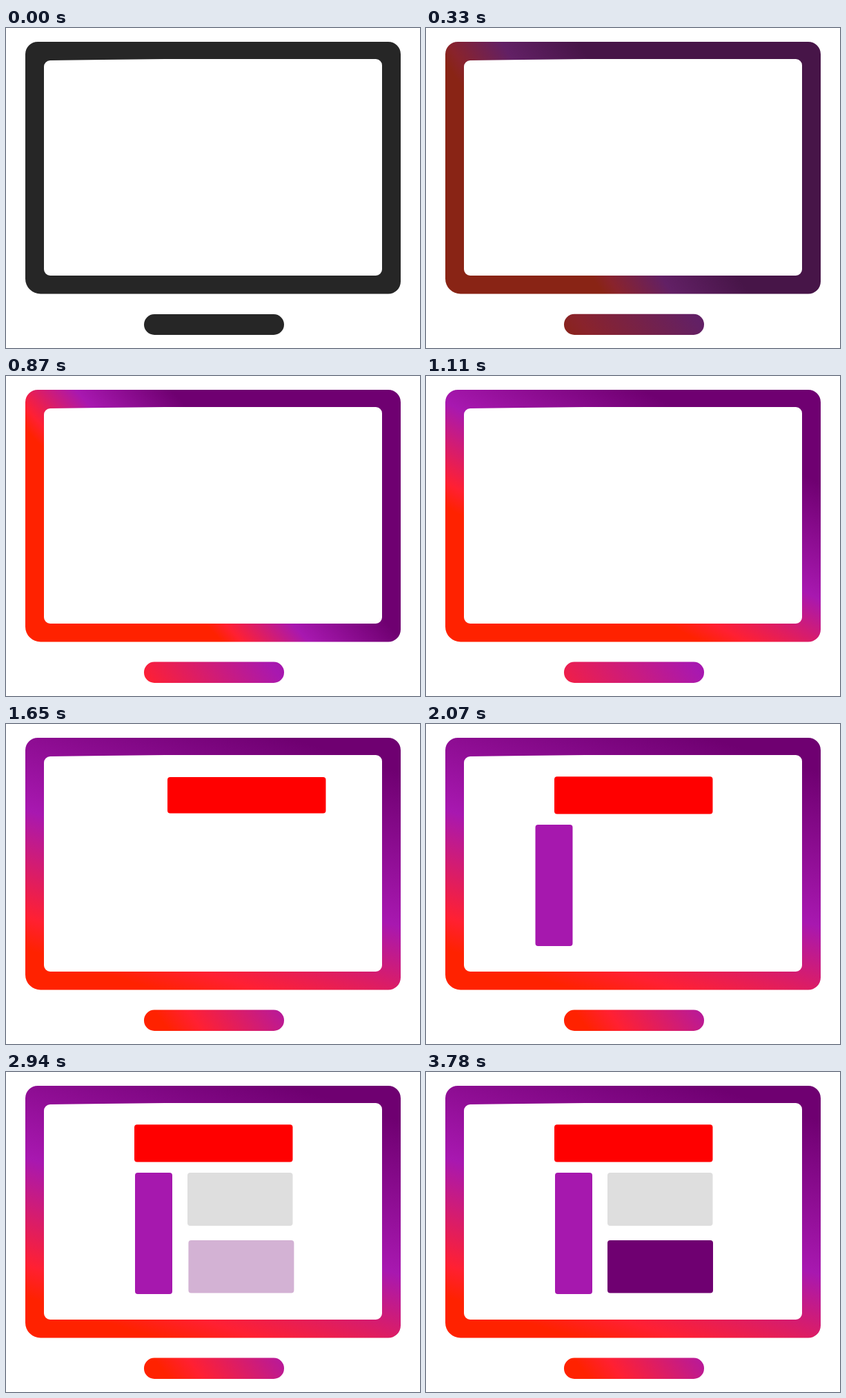
An HTML page with a canvas for the animation above (7.5 s loop, 600 by 464 pixels).

```html
<!DOCTYPE html>
<html lang="en">
<head>
<meta charset="utf-8">
<title>Monitor layout</title>
<style>
  html, body { margin: 0; width: 100%; height: 100%; overflow: hidden; background: #fff; }
  canvas { display: block; }
</style>
</head>
<body>
<canvas id="stage" width="600" height="464"></canvas>
<script>
const ctx = document.getElementById('stage').getContext('2d');
const LOOP = 7500, STEP = 30;
const DARK = [38, 38, 38];
const STOPS = [
  [0, [255, 34, 0]],
  [0.11, [255, 32, 50]],
  [0.475, [168, 24, 176]],
  [1, [111, 0, 113]]
];

const lerp = (a, b, k) => a + (b - a) * k;
const span = (t, from, to) => Math.min(1, Math.max(0, (t - from) / (to - from)));

function gradient(x, y, dx, dy, tint) {
  const g = ctx.createLinearGradient(x, y, x + dx, y + dy);
  for (const [pos, rgb] of STOPS) {
    const mix = rgb.map((c, i) => Math.round(lerp(DARK[i], c, tint)));
    g.addColorStop(pos, `rgb(${mix})`);
  }
  return g;
}

function block(x0, y0, x1, y1, color, alpha = 1) {
  ctx.globalAlpha = alpha;
  ctx.fillStyle = color;
  ctx.beginPath();
  ctx.roundRect(x0, y0, x1 - x0, y1 - y0, 4);
  ctx.fill();
  ctx.globalAlpha = 1;
}

function drawFrame(tint, k) {
  ctx.fillStyle = gradient(
    lerp(73, 250, k), lerp(115.8, 395.7, k),
    lerp(145, 121, k), lerp(-99, -388, k), tint);
  ctx.beginPath();
  ctx.roundRect(28, 20, 544, 365.5, [18, 18, 18, 22]);
  // screen opening, its top edge slightly uneven
  ctx.moveTo(64, 47);
  ctx.lineTo(140, 46);
  ctx.lineTo(230, 45);
  ctx.lineTo(536, 45);
  ctx.arcTo(545, 45, 545, 54, 9);
  ctx.lineTo(545, 350);
  ctx.arcTo(545, 359, 536, 359, 9);
  ctx.lineTo(64, 359);
  ctx.arcTo(55, 359, 55, 350, 9);
  ctx.lineTo(55, 56);
  ctx.arcTo(55, 47, 64, 47, 9);
  ctx.closePath();
  ctx.fill('evenodd');
}

function drawStand(tint, k) {
  const swell = 4 * k * (1 - k);
  const x = lerp(177, 225, k) - 125 * swell;
  const reach = 0.8 * (lerp(464, 449, k) + 215 * swell);
  ctx.fillStyle = gradient(x, 430, 0.8 * reach, -0.6 * reach, tint);
  ctx.beginPath();
  ctx.roundRect(200, lerp(415, 414.5, tint), 203, lerp(30, 30.5, tint), 15);
  ctx.fill();
}

function drawBlocks(t) {
  if (t >= 1470) {
    const dx = lerp(192, 0, span(t, 1470, 1710));
    const grow = span(t, 1650, 1710);
    ctx.save();
    ctx.beginPath();
    ctx.rect(0, 0, 572, 464);
    ctx.clip();
    block(186 + dx, 77 - grow * 0.7, 415.5 + dx, 129.5 + grow, '#ff0000');
    ctx.restore();
  }
  if (t >= 1920) {
    const dx = lerp(-57, 0, span(t, 1920, 2220));
    block(187 + dx, 146, 241 + dx, 322, '#a618ae');
  }
  if (t >= 2400) {
    const k = span(t, 2400, 2550), dx = lerp(56, 0, k);
    block(263 + dx, 147 - k, 415.5 + dx, 222 + k, k < 1 ? '#e0e0e0' : '#dedede');
  }
  if (t >= 2700) {
    const left = 1 - span(t, 2700, 3000);
    const dx = 35 * left * left;
    block(263 + dx, 244, 416 + dx, 320.5, '#6f0071', lerp(0.1, 1, span(t, 2700, 3780)));
  }
}

function draw(now) {
  const t = Math.floor((now % LOOP) / STEP) * STEP;
  const tint = span(t, 0, 720);
  const k = Math.pow(span(t, 750, 1320), 1.4);
  ctx.fillStyle = '#fff';
  ctx.fillRect(0, 0, 600, 464);
  drawFrame(tint, k);
  drawStand(tint, k);
  drawBlocks(t);
}

const start = performance.now();
function tick() {
  draw(performance.now() - start);
  requestAnimationFrame(tick);
}
tick();
</script>
</body>
</html>
```
